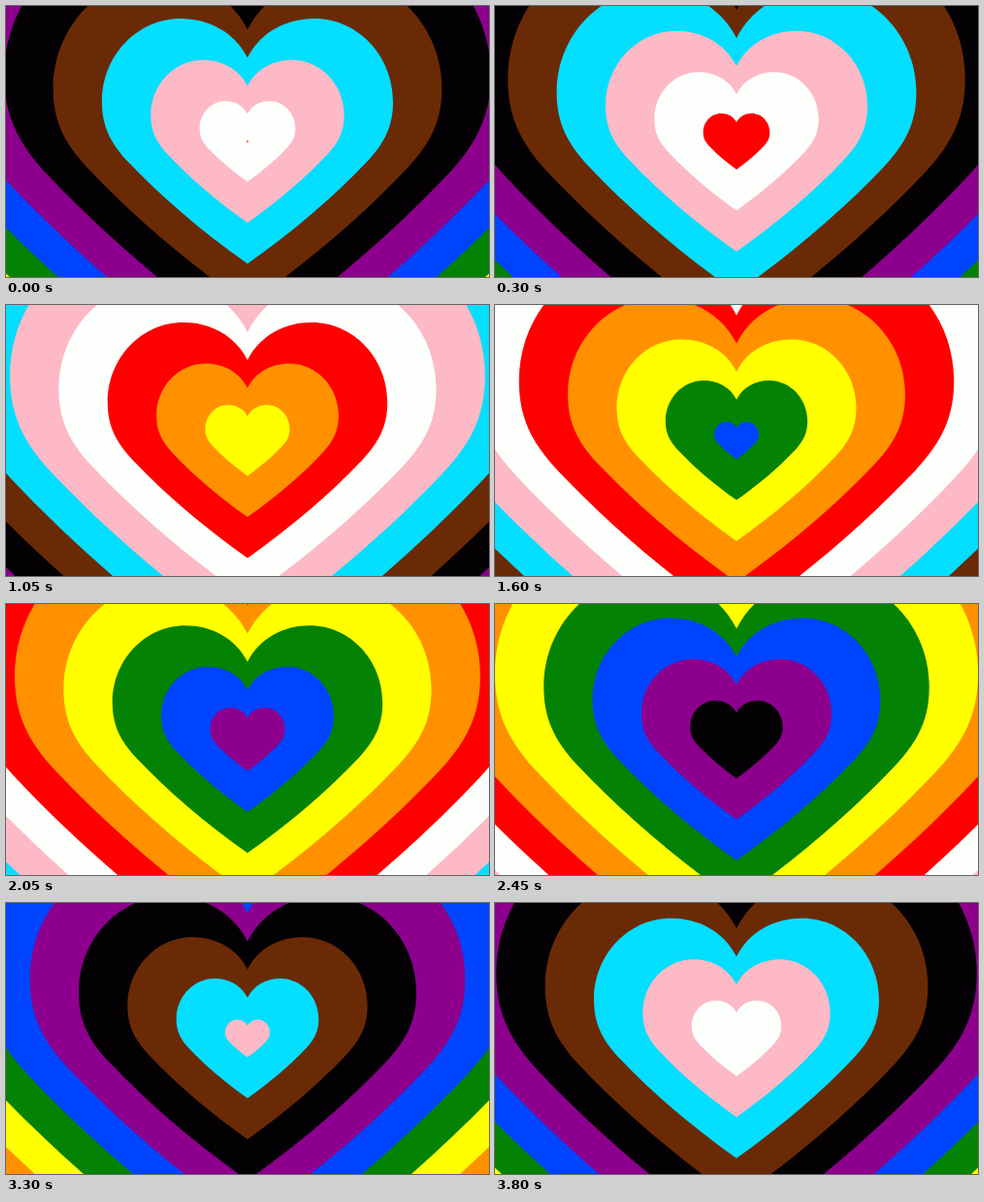
Write an HTML page with a canvas that moves like this. It is 498 by 280 pixels and loops after 3850 ms.

```html
<!DOCTYPE html>
<html lang="en">
<head>
<meta charset="utf-8">
<title>Rainbow hearts</title>
<style>
  html, body { margin: 0; width: 100%; height: 100%; overflow: hidden; background: #000; }
  canvas { display: block; }
</style>
</head>
<body>
<canvas id="stage" width="498" height="280"></canvas>
<script>
const ctx = document.getElementById('stage').getContext('2d');

// Rainbow, then the stripes of the chevron, in order of birth
const COLORS = [
  '#ff0000', '#ff9100', '#ffff00', '#048204', '#0044ff', '#8d008d',
  '#030103', '#6b2a06', '#04deff', '#fdb9c6', '#fdfffc'
];
const LOOP = 3850, STEP = 50;
const GAP = 100.7;              // width difference between neighbouring hearts
const EASE_IN = 120, EASE_OUT = 60;
const TRAVEL = GAP * COLORS.length;
const SPEED = TRAVEL / (LOOP - (EASE_IN + EASE_OUT) / 2);

// Heart of width 1, centred on its scaling point
const HALF = [
  [-.045, -.378, -.135, -.423, -.23, -.423],
  [-.379, -.423, -.5, -.295, -.5, -.137],
  [-.5, -.055, -.473, .003, -.41, .07],
  [-.296, .191, -.159, .308, 0, .421]
];
const heart = new Path2D();
for (const side of [1, -1]) {
  heart.moveTo(0, -.288);
  for (const c of HALF) heart.bezierCurveTo(...c.map((v, i) => i % 2 ? v : v * side));
}

// Width of the first heart: short ramps at both ends, nearly steady between
function widthAt(t) {
  const left = LOOP - t;
  let d;
  if (t < EASE_IN) d = SPEED * t * t / (2 * EASE_IN);
  else if (left < EASE_OUT) d = TRAVEL - SPEED * left * left / (2 * EASE_OUT);
  else d = SPEED * (t - EASE_IN / 2);
  return d - 2 - 3.7 * Math.sin(Math.PI * t / LOOP) ** 4;
}

function draw(t) {
  const w = widthAt(t), n = COLORS.length;
  const newest = Math.floor((w + 3) / GAP);
  for (let i = newest - n; i <= newest; i++) {
    const size = Math.max(w - i * GAP, 2);
    ctx.setTransform(size, 0, 0, size, 249, 140);
    ctx.fillStyle = COLORS[(i + 2 * n) % n];
    ctx.fill(heart);
  }
}

const start = performance.now();
function tick() {
  const t = (performance.now() - start) % LOOP;
  draw(Math.floor(t / STEP) * STEP);
  requestAnimationFrame(tick);
}
tick();
</script>
</body>
</html>
```
